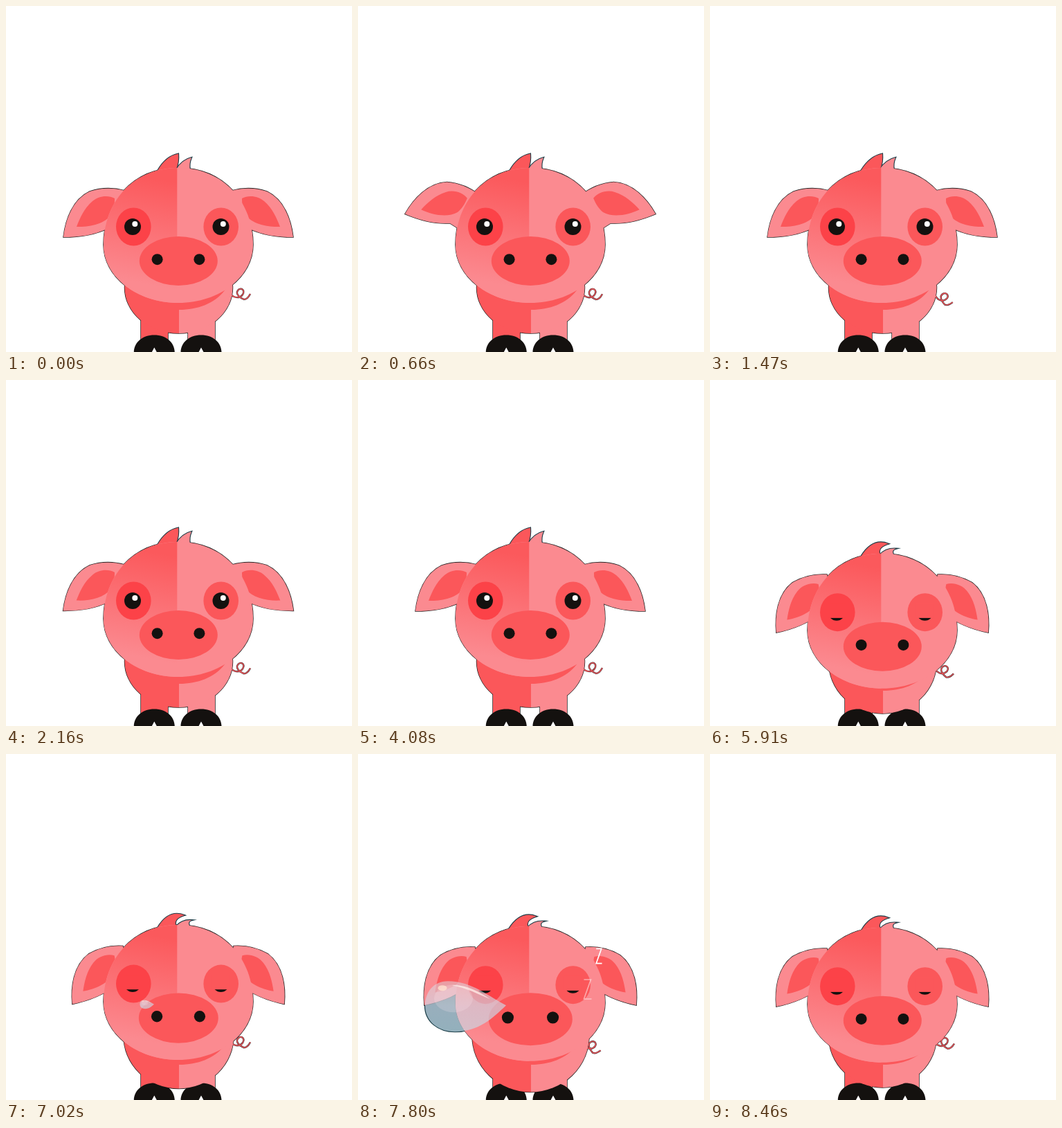
Write an HTML page with a canvas that moves like this. It is 500 by 500 pixels and loops after 9 s.

```html
<!DOCTYPE html>
<html lang="en">
<head>
<meta charset="utf-8">
<title>Sleepy piglet</title>
<style>
  html, body { margin: 0; width: 100%; height: 100%; overflow: hidden; background: #fff; }
  canvas { display: block; width: 100vw; height: 100vh; object-fit: contain; }
</style>
</head>
<body>
<canvas id="stage" width="500" height="500"></canvas>
<script>
const ctx = document.getElementById('stage').getContext('2d');
const LOOP = 9000, STEP = 30, MID = 249;
const LIGHT = '#fb8a90', DEEP = '#fb575a', RED = '#fc4248', INK = '#14110f';
const EDGE = '#222', TEAL = '#245c68', DARK_TEAL = '#1b3c46';

const EAR = new Path2D('M326 267C344 262 362 263 377 268C402 280 412 309 415 334C394 334 372 332 350 321L326 325Z');
const EAR_INNER = new Path2D('M341 278C350 273 364 274 373 282C385 292 391 306 396 319C378 320 356 315 346 302C342 295 341 287 341 278Z');
const HEAD = new Path2D('M141 345C141 285 182 234 249 234C316 234 357 285 357 345C357 391 309 429 249 429C189 429 141 391 141 345Z');
const TAIL = new Path2D('M326 417C331 422 339 423 343 417C347 410 340 406 336 411C332 417 340 422 345 424C349 424 352 420 354 416');
const LEGS = new Path2D('M195 445H234V488H195ZM263 445H302V488H263Z');
const HOOF = new Path2D('M-29.5 0C-29 -14 -17 -24.5 0 -24.5C17 -24.5 29 -14 29.5 0H3.5L0 -6.5L-3.5 0Z');
const SHADE = new Path2D('M250 400V439C277 439 301 430 316 411L300 400Z');
const DROP = new Path2D('M0 0C-24 -12 -49 -35 -84 -35C-106 -35 -117 -18 -117 0C-117 24 -97 38 -74 38C-39 38 -19 18 0 0Z');
const ZED = new Path2D('M-5 -14H5L-5 14H6');

// Tufts run from left over a tip to right; tip and controls bend from up to flat
const TUFTS = [
  { fill: LIGHT, left: [246, 236], right: [266, 237],
    up: [[255, 222], [268, 219], [264, 228]], flat: [[254, 226], [269, 227], [261, 229]] },
  { fill: DEEP, left: [219, 238], right: [246, 236],
    up: [[231, 217], [249, 213.5], [250, 225]], flat: [[235, 211], [258, 220], [241, 225]] }
];

const mix = (a, b, p) => a + (b - a) * p;
const part = (t, from, to) => Math.min(1, Math.max(0, (t - from) / (to - from)));
const ramp = (t, from, to) => { const p = part(t, from, to); return p * p * (3 - 2 * p); };
const swing = (t, from, to, times) => (1 - Math.cos(2 * Math.PI * times * part(t, from, to))) / 2;

function poseAt(t) {
  const doze = ramp(t, 4080, 4860);
  const lift = ramp(t, 6840, 7400) - ramp(t, 7400, 7920);
  const swell = ramp(t, 6840, 7560) - ramp(t, 7560, 8160);
  const flap = swing(t, 330, 1020, 1) + swing(t, 1530, 2190, 1) + swing(t, 4080, 4440, 1);
  const wag = swing(t, 330, 1020, 2) + swing(t, 1260, 2190, 2) + swing(t, 4080, 8460, 8.85);
  return {
    doze, wag,
    drop: 16.7 * doze - 15 * lift,
    ear: 12 * doze - 23 * flap,
    lid: mix(-13, 8.2, ramp(t, 4080, 4620)),
    bellyW: 78 + 10 * swell,
    bellyH: 66 + 9 * doze + 10 * swell,
    snout: 1 + .11 * swell,
    bubble: 1.17 * (part(t, 6900, 7700) - part(t, 7720, 8270))
  };
}

function fill(path, color) {
  ctx.fillStyle = color;
  ctx.fill(path);
}

function stroke(path, color, width) {
  ctx.strokeStyle = color;
  ctx.lineWidth = width;
  ctx.stroke(path);
}

function oval(x, y, rx, ry, color) {
  const p = new Path2D();
  p.ellipse(x, y, rx, ry, 0, 0, 7);
  if (color) fill(p, color);
  return p;
}

function group(draw) {
  ctx.save();
  draw();
  ctx.restore();
}

function band(x, width, draw) {
  group(() => {
    ctx.beginPath();
    ctx.rect(x, 0, width, 500);
    ctx.clip();
    draw();
  });
}

function place(path, matrix) {
  const p = new Path2D();
  p.addPath(path, matrix);
  return p;
}

function earMatrix(pose, side) {
  return new DOMMatrix().translate(MID, pose.drop).scale(side, 1)
    .translate(91, 280).rotate(pose.ear).translate(-340, -280);
}

function tuftPath({ left, right, up, flat }, pose) {
  const bent = up.map((pt, i) => pt.map((v, k) => mix(v, flat[i][k], pose.doze)));
  const p = new Path2D();
  p.moveTo(left[0] - pose.wag, left[1]);
  p.quadraticCurveTo(...bent[0], ...bent[1]);
  p.quadraticCurveTo(...bent[2], ...right);
  return place(p, new DOMMatrix().translate(0, pose.drop));
}

function drawTail(pose) {
  const path = place(TAIL, new DOMMatrix().translate(325, 417).rotate(26 * pose.wag).translate(-326, -417));
  stroke(path, '#33252b', 2.4);
  stroke(path, DEEP, 1.3);
}

function drawBody(belly, pose) {
  const halves = path => {
    band(0, 250, () => fill(path, DEEP));
    band(250, 250, () => fill(path, LIGHT));
  };
  halves(LEGS);
  for (const x of [214.3, 282]) fill(place(HOOF, new DOMMatrix().translate(x, 500)), INK);
  halves(belly);
  group(() => {
    ctx.clip(belly);
    fill(place(SHADE, new DOMMatrix().translate(0, 10 * pose.doze)), DEEP);
  });
}

function drawEye(x, shift, patch, lid) {
  const y = 319;
  oval(x + shift, y, 25.3, 27.5, patch);
  oval(x, y, 12, 12, INK);
  oval(x + 3.3, y - 4, 4, 4, '#fff');
  ctx.fillStyle = patch;
  ctx.fillRect(x - 13, y - 13, 26, lid + 13);
}

function drawFace(pose) {
  const fade = ctx.createLinearGradient(218, 250, 190, 400);
  fade.addColorStop(0, '#fb595c');
  fade.addColorStop(1, LIGHT);
  fill(HEAD, LIGHT);
  band(0, 247.3, () => fill(HEAD, fade));
  drawEye(183, 1.3, RED, pose.lid);
  drawEye(310.5, .2, DEEP, pose.lid);
  const s = pose.snout;
  oval(249.3, 368.5, 56.5 * s, 35.5 * s, DEEP);
  for (const side of [-1, 1]) oval(MID + side * 30.4 * s, 366.2, 8 * s, 8 * s, INK);
}

function inBubble(pose, draw) {
  if (pose.bubble < .01) return;
  group(() => {
    ctx.translate(214, 348.5 + pose.drop);
    ctx.scale(pose.bubble, pose.bubble);
    draw();
  });
}

function drawBubble() {
  const sheen = ctx.createLinearGradient(0, -35, 0, 38);
  sheen.addColorStop(0, 'rgba(222,214,222,.55)');
  sheen.addColorStop(.5, 'rgba(207,213,228,.68)');
  sheen.addColorStop(1, 'rgba(200,216,228,.68)');
  fill(DROP, sheen);
  oval(-76, -10, 28, 20, 'rgba(255,235,240,.2)');
  fill(new Path2D('M-78 -29C-57 -30 -38 -19 -23 -9C-40 -16 -57 -25 -78 -29Z'), 'rgba(255,240,235,.75)');
  oval(-92, -25, 6.5, 4, 'rgba(255,226,208,.8)');
}

function drawZed(x, y, size, alpha) {
  ctx.globalAlpha = alpha;
  stroke(place(ZED, new DOMMatrix().translate(x, y).scale(size)), '#fff', 1.7);
  ctx.globalAlpha = 1;
}

function drawZeds(t) {
  for (const start of [4560, 7500]) {
    const p = part(t, start, start + 900);
    const alpha = Math.min(1, p * 3.4, (1 - p) * 4);
    drawZed(331.5, 345 - 15 * p, 1, .48 * alpha);
    drawZed(348, 300 - 24 * p, .76, alpha);
  }
}

function draw(t) {
  const pose = poseAt(t);
  const down = new DOMMatrix().translate(0, pose.drop);
  const belly = oval(249.5, 407, pose.bellyW, pose.bellyH);
  const ears = [-1, 1].map(side => earMatrix(pose, side));
  const tufts = TUFTS.map(tuft => tuftPath(tuft, pose));

  ctx.fillStyle = '#fff';
  ctx.fillRect(0, 0, 500, 500);
  inBubble(pose, () => {
    stroke(DROP, DARK_TEAL, 2.4);
    fill(DROP, TEAL);
  });

  // The outline shows only around the whole silhouette
  for (const path of [LEGS, belly, place(HEAD, down), ...ears.map(m => place(EAR, m))]) stroke(path, EDGE, 1.5);
  tufts.forEach(path => stroke(path, DARK_TEAL, 2.2));
  drawTail(pose);
  drawBody(belly, pose);
  for (const m of ears) {
    fill(place(EAR, m), LIGHT);
    fill(place(EAR_INNER, m), DEEP);
  }
  tufts.forEach((path, i) => fill(path, TUFTS[i].fill));
  group(() => {
    ctx.translate(0, pose.drop);
    drawFace(pose);
  });
  drawZeds(t);
  inBubble(pose, drawBubble);
}

function tick() {
  const t = performance.now() % LOOP;
  draw(Math.floor(t / STEP) * STEP);
  requestAnimationFrame(tick);
}
tick();
</script>
</body>
</html>
```
